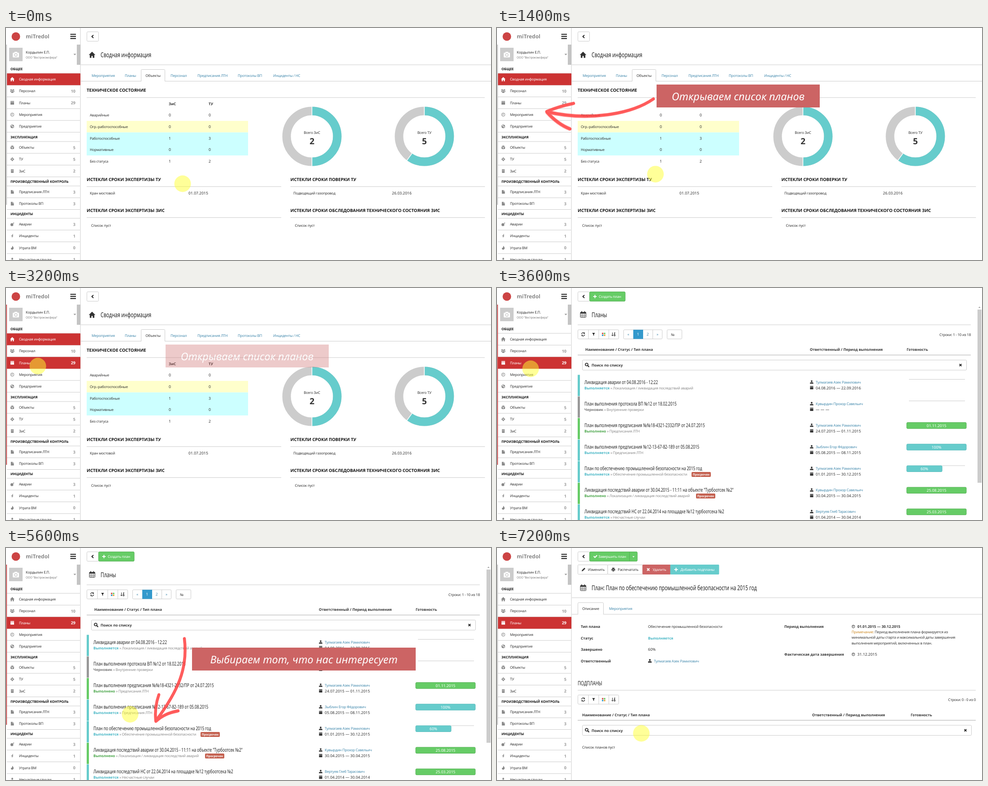
Animation, 1082 px wide and 517 px high, one loop 8 s. Source, as an HTML page:

```html
<!DOCTYPE html>
<html lang="ru">
<head>
<meta charset="utf-8">
<title>Планы</title>
<style>
html, body { margin: 0; width: 100%; height: 100%; overflow: hidden; background: #fff; }
svg { display: block; width: 100%; height: 100%; }
text { font: 8px "Noto Sans", "Open Sans", sans-serif; letter-spacing: -.25px; fill: #333; text-rendering: geometricPrecision; white-space: pre; }
.n { font-size: 8.6px; letter-spacing: 0; }
.b { font-weight: 700; font-size: 8.1px; letter-spacing: 0; }
.h { font-weight: 700; font-size: 9.6px; letter-spacing: 0; fill: #111; }
.s { font-weight: 700; font-size: 7.45px; letter-spacing: 0; fill: #111; }
.count { font-weight: 700; font-size: 9px; letter-spacing: 0; fill: #999; }
.cond { letter-spacing: 0; fill: #222; }
.say { font-size: 23.3px; font-style: italic; font-weight: 500; letter-spacing: 0; }
.tag { font-weight: 700; font-size: 6.6px; letter-spacing: 0; }
.total { font-weight: 700; font-size: 19px; }
.logo { font-weight: 700; font-size: 12px; letter-spacing: 0; fill: #888; }
.firm { font-size: 6.5px; fill: #777; }
.link { fill: #4088ac; }
.mute { fill: #888; }
.white { fill: #fff; }
.e { text-anchor: end; }
.m { text-anchor: middle; }
</style>
</head>
<body>
<svg id="stage" viewBox="0 0 1082 517" preserveAspectRatio="none"></svg>
<script>
const TEAL = '#66cccc', GREEN = '#66cc66', GREY = '#cccccc', RED = '#cc3333', ROSE = '#cc6464', DARK = '#333';

const ICONS = {
  home: 'M-5 0L0-5 5 0H3.5V4.5H1V1.5H-1V4.5H-3.5V0Z',
  people: 'M-1.6-1.5a1.6 1.6 0 1 1 3.2 0a1.6 1.6 0 1 1-3.2 0ZM-2.5 4V2Q-2.5 .6 0 .6T2.5 2V4ZM-4-2.5a1.2 1.2 0 1 1 2.2 0a1.2 1.2 0 1 1-2.2 0ZM1.8-2.5a1.2 1.2 0 1 1 2.2 0a1.2 1.2 0 1 1-2.2 0ZM-4.5 2V-.5H-2.6V2ZM4.5 2V-.5H2.6V2Z',
  user: 'M-2-2a2 2 0 1 1 4 0a2 2 0 1 1-4 0ZM-4 4V2.5Q-4 .6 0 .6T4 2.5V4Z',
  plan: 'M-4-4H4V-2.2H-4ZM-4-1.4H4V4H-4Z',
  clock: 'M-4 0a4 4 0 1 1 8 0a4 4 0 1 1-8 0ZM-3 0a3 3 0 1 0 6 0a3 3 0 1 0-6 0ZM-.5-2.2H.5V.7H-1.8V-.3H-.5Z',
  globe: 'M-4 0a4 4 0 1 1 8 0a4 4 0 1 1-8 0ZM-2.5-2L0-3 .5-1-1 .5ZM.5 0L3-.5 2 2.5.5 2Z',
  cube: 'M0-4.5L4-2.5 0-.7-4-2.5ZM-4-1.5L-.5 0V4.2L-4 2.5ZM4-1.5L.5 0V4.2L4 2.5Z',
  gear: 'M-3 0a3 3 0 1 1 6 0a3 3 0 1 1-6 0ZM-1.2 0a1.2 1.2 0 1 0 2.4 0a1.2 1.2 0 1 0-2.4 0ZM-.8-4.2H.8V-3H-.8ZM-.8 3H.8V4.2H-.8ZM-4.2-.8H-3V.8H-4.2ZM3-.8H4.2V.8H3Z',
  house: 'M-3-4H3V4H-3ZM-1.8-2.8H-.6V-1.6H-1.8ZM.6-2.8H1.8V-1.6H.6ZM-1.8-.4H-.6V.8H-1.8ZM.6-.4H1.8V.8H.6Z',
  file: 'M-3.2-4H.6V-1H3.5V4H-3.2ZM1.3-4L3.5-1.7H1.3Z',
  bomb: 'M-4 1a3.2 3.2 0 1 1 6.4 0a3.2 3.2 0 1 1-6.4 0ZM1.6-2L3-4 4.4-3 2.6-1Z',
  bolt: 'M1-4.5L-2.5.8H-.3L-1 4.5 2.5-1H.3L2-4.5Z',
  flame: 'M0-4.5Q4-.5 2.8 2.3Q1.5 4.3 0 4.3Q-4 4-2.8-.5Q-1.8 1-1.2.5Q0-2 0-4.5Z',
  cross: 'M-3.4-2L-2-3.4 0-1.4 2-3.4 3.4-2 1.4 0 3.4 2 2 3.4 0 1.4-2 3.4-3.4 2-1.4 0Z',
  plus: 'M-1-4H1V-1H4V1H1V4H-1V1H-4V-1H-1Z',
  check: 'M-4.5 0L-3-1.5-1 .5 3-3.5 4.5-2-1 3.5Z',
  pencil: 'M-4 4L-3.3 1.3 2-4 4-2-1.3 3.3Z',
  printer: 'M-2.5-4H2.5V-1.8H-2.5ZM-4-1.2H4V2.2H2.5V.8H-2.5V2.2H-4ZM-2 1.5H2V4H-2Z',
  funnel: 'M-4-4H4L1 0V4L-1 3V0Z',
  caret: 'M-3-1.5H3L0 1.8Z'
};

const icon = (name, x, y, fill = DARK, k = 1) =>
  `<path d="${ICONS[name]}" fill="${fill}" fill-rule="evenodd" transform="translate(${x} ${y}) scale(${k})"/>`;
const box = (x1, y1, x2, y2, fill, stroke = 'none', r = 0) =>
  `<rect x="${x1}" y="${y1}" width="${x2 - x1}" height="${y2 - y1}" rx="${r}" fill="${fill}" stroke="${stroke}"/>`;
const stroke = (d, color = GREY, w = 1) => `<path d="${d}" fill="none" stroke="${color}" stroke-width="${w}"/>`;
const rule = (x1, x2, y, w = 1) => stroke(`M${x1} ${y}H${x2}`, GREY, w);
const text = (x, y, s, cls = '') =>
  `<text x="${x}" y="${y}" class="${/^[\d.%— ]+$/.test(s) ? 'n ' : ''}${cls}">${s}</text>`;
const narrow = (x, y, size, s) =>
  `<text class="cond" transform="translate(${x} ${y}) scale(.7 1)" style="font-size:${size}px">${s}</text>`;
const group = (id, body) => `<g id="${id}">${body}</g>`;

// Sidebar
const MENU = [
  [101, 'ОБЩЕЕ', [['home', 'Сводная информация', ''], ['people', 'Персонал', 10], ['plan', 'Планы', 29],
    ['clock', 'Мероприятия', ''], ['globe', 'Предприятие', '']]],
  [253, 'ЭКСПЛУАТАЦИЯ', [['cube', 'Объекты', 5], ['gear', 'ТУ', 5], ['house', 'ЗиС', 2]]],
  [352, 'ПРОИЗВОДСТВЕННЫЙ КОНТРОЛЬ', [['file', 'Предписания ЛТН', 3], ['file', 'Протоколы ВП', 3]]],
  [424, 'ИНЦИДЕНТЫ', [['bomb', 'Аварии', 3], ['bolt', 'Инциденты', 1], ['flame', 'Утрата ВМ', 0],
    ['user', 'Несчастные случаи', 1]]]
];
const ROW = 26.25;

function menuRow(top, i, [pic, label, count], active) {
  const y = top + i * ROW + 13.2, white = active ? 'white' : '';
  return (active ? box(2, y - 13, 166, y + 13.2, RED) : rule(2, 165, top + (i + 1) * ROW)) +
    icon(pic, 14, y, active ? '#fff' : '#888') + text(29, y + 3, label, white) + text(155, y + 3.3, count, 'count e ' + white);
}

const sidebar = box(0, 0, 166, 517, '#fff') + stroke('M166 0V517') +
  MENU.map(([top, title, rows]) => rule(2, 165, top) + text(10, top - 6.8, title, 's') +
    rows.map((r, i) => menuRow(top, i, r)).join('')).join('') +
  `<circle cx="22" cy="19" r="9.5" fill="#c44"/>` + text(44, 22.5, 'miTredol', 'logo') +
  stroke('M143.500 14H156M143.500 18.700H156M143.500 23.400H156', '#222', 2.2) +
  box(7, 44, 37, 74, GREY) + box(15, 55, 29, 65.5, '#fff', 'none', 1.5) + box(19, 53, 25, 56, '#fff') +
  `<circle cx="22" cy="60" r="3" fill="#fff" stroke="${GREY}" stroke-width="1.3"/>` +
  text(44, 56.5, 'Кордылин Е.П.') + text(44, 68, 'ООО "Вестрокомсфера"', 'firm') +
  icon('caret', 153.5, 59, '#999') + box(158, 37, 166, 82, '#c4c4c4') +
  group('hover0', menuRow(101, 0, MENU[0][2][0], true)) + group('hover2', menuRow(101, 2, MENU[0][2][2], true)) +
  `<rect id="strip" y="37" width="2.2" height="357"/>`;

// Shared parts
const back = box(180.5, 8.5, 206.5, 29.5, '#fff', GREY, 2) + stroke('M195 15.700L191.500 19 195 22.300', '#222', 1.9);
const calendar = y => box(186, y - 5, 198.5, y + 6.5, '#fff', DARK, 1) + box(186, y - 5, 198.5, y - 2, DARK) +
  stroke(`M189 ${y - 7.5}V${y - 4}M195.500 ${y - 7.5}V${y - 4}`, DARK, 1.6) +
  stroke(`M186 ${y + 1}H198.500M186 ${y + 3.7}H198.500M190 ${y - 2}V${y + 6}M194.500 ${y - 2}V${y + 6}`, '#555', .8);
const tab = (x1, x2, y, s) => rule(167, 1082, y) +
  stroke(`M${x1 + .5} ${y}V${y - 24}q0-2 2-2H${x2 - 2.5}q2 0 2 2V${y}`) + rule(0, 0, 0) +
  stroke(`M${x1 + 1} ${y}H${x2 - 1}`, '#fff', 1.6) + text((x1 + x2) / 2, y - 9.5, s, 'm');

function toolbar(y) {
  const c = y + 10.2;
  return box(180.5, y, 271.5, y + 20.5, '#fff', GREY, 2) + stroke(`M204 ${y}v20.500M227 ${y}v20.500M249.500 ${y}v20.500`) +
    stroke(`M188.700 ${c - .5}a3.500 3.500 0 0 1 6.400-1.600M195.700 ${c + .7}a3.500 3.500 0 0 1-6.400 1.600`, '#222', 1.3) +
    stroke(`M195.500 ${c - 4}v2.400h-2.600M189 ${c + 4}v-2.400h2.600`, '#222', 1) +
    icon('funnel', 215.5, c, '#222', .8) +
    box(234, c - 3.5, 237.3, c - .3, '#d9534f') + box(238.3, c - 3.5, 241.7, c - .3, GREEN) +
    box(234, c + .6, 237.3, c + 3.8, '#39c') + box(238.3, c + .6, 241.7, c + 3.8, '#e8a33d') +
    stroke(`M257.500 ${c - 4}v7M255.700 ${c + 1.5}l1.800 2.300 1.800-2.300M261 ${c - 3.5}h2.600l-2.600 3h2.600M261 ${c + 1}h2.600v2.600h-2.600z`, '#222', 1);
}

const listHead = (y, xs, right) =>
  ['Наименование / Статус / Тип плана', 'Ответственный / Период выполнения', 'Готовность']
    .map((s, i) => text(xs[i], y, s, 'b')).join('') +
  rule(180, right, y + 9.3, 1.8) + box(190.5, y + 20.5, right - 9.5, y + 43, '#fff', GREY, 2) +
  `<circle cx="200" cy="${y + 30.5}" r="3" fill="none" stroke="#222" stroke-width="1.6"/>` +
  stroke(`M202 ${y + 32.5}l3.500 3.500`, '#222', 2) + text(211, y + 35, 'Поиск по списку', 'b') +
  icon('cross', right - 23, y + 31.7, '#222', .9);

// Summary page
function donut(x, label, total, share) {
  const cut = a => `<path d="M0-70V-44" stroke="#fff" stroke-width="1.6" transform="rotate(${a})"/>`;
  const ring = (color, part) => `<circle r="56.500" fill="none" stroke="${color}" stroke-width="19" pathLength="100" stroke-dasharray="${part} 100" transform="rotate(-90)"/>`;
  return `<g transform="translate(${x} 241.500)">${ring(GREY, 100)}${ring(TEAL, share)}${cut(0)}${cut(share * 3.6)}` +
    text(0, -6, label, 'm') + `<text y="17" class="total m">${total}</text></g>`;
}
const expired = (x, y, title) => text(x, y, title, 'h') + rule(x, x + 434, y + 12.5);
const STATES = [['Аварийные', 0, 0], ['Огр.-работоспособные', 0, 0], ['Работоспособные', 1, 3], ['Нормативные', 0, 0], ['Без статуса', 1, 2]];

const summary = back + icon('home', 192, 60, DARK, 1.45) + narrow(211, 64.5, 15, 'Сводная информация') + rule(167, 1082, 82) +
  tab(301, 355, 118.5, 'Объекты') +
  [[191, 'Мероприятия'], [265, 'Планы'], [367, 'Персонал'], [427, 'Предписания ЛТН'], [517, 'Протоколы ВП'], [596, 'Инциденты / НС']]
    .map(([x, s]) => text(x, 109, s, 'link')).join('') +
  text(180, 142, 'ТЕХНИЧЕСКОЕ СОСТОЯНИЕ', 'h') + rule(180, 1068, 155) +
  text(363, 171.7, 'ЗиС', 'b') + text(452, 171.7, 'ТУ', 'b') +
  box(180, 207, 540, 232.7, '#ffffcc') + box(180, 232.7, 540, 284, '#ccffff') +
  STATES.map((r, i) => r.map((s, j) => text([187, 363, 452][j], 197.3 + i * 25.7, s)).join('')).join('') +
  donut(682.5, 'Всего ЗиС', 2, 50) + donut(933.3, 'Всего ТУ', 5, 60) +
  expired(180, 341, 'ИСТЕКЛИ СРОКИ ЭКСПЕРТИЗЫ ТУ') + expired(634.5, 341, 'ИСТЕКЛИ СРОКИ ПОВЕРКИ ТУ') +
  expired(180, 410, 'ИСТЕКЛИ СРОКИ ЭКСПЕРТИЗЫ ЗИС') + expired(634.5, 410, 'ИСТЕКЛИ СРОКИ ОБСЛЕДОВАНИЯ ТЕХНИЧЕСКОГО СОСТОЯНИЯ ЗИС') +
  text(187, 370.5, 'Кран мостовой') + text(407, 370.5, '01.07.2015') +
  text(641, 370.5, 'Подводящий газопровод') + text(861, 370.5, '26.03.2016') +
  text(190, 443, 'Список пуст') + text(644.5, 443, 'Список пуст');

// Plan list page
const STATUS = { 'Выполняется': [TEAL, '#45b5c4'], 'Черновик': ['#999', '#777'], 'Выполнено': [GREEN, '#47a447'] };
const BOSS = 'Тулмагаев Азек Рамилович', DEPUTY = 'Кувырдин Прохор Савельич';
const PLANS = [
  ['Ликвидация аварии от 04.08.2016 - 12:22', 'Выполняется', 'Локализация / ликвидация последствий аварий', BOSS, '04.08.2016 — 22.09.2016', ''],
  ['План выполнения протокола ВП №12 от 18.02.2015', 'Черновик', 'Внутренние проверки', DEPUTY, '— — —', ''],
  ['План выполнения предписания №№18-4321-2332/ПР от 24.07.2015', 'Выполнено', 'Предписания ЛТН', BOSS, '24.07.2015 — 01.11.2015', '01.11.2015'],
  ['План выполнения предписания №12-13-67-82-189 от 05.08.2015', 'Выполняется', 'Предписания ЛТН', 'Зыблин Егор Фёдорович', '05.08.2015 — 08.11.2015', '100%'],
  ['План по обеспечению промышленной безопасности на 2015 год', 'Выполняется', 'Обеспечение промышленной безопасности', BOSS, '01.01.2015 — 30.12.2015', '60%', 434],
  ['Ликвидация последствий аварии от 30.04.2015 - 11:11 на объекте "Турбоотсек №2"', 'Выполнено', 'Локализация / ликвидация последствий аварий', DEPUTY, '30.04.2015 — 30.04.2015', '25.08.2015', 444],
  ['Ликвидация последствий НС от 22.04.2014 на площадке №12 турбоотсека №2', 'Выполняется', 'Несчастные случаи', 'Вертуев Глеб Тарасович', '01.04.2014 — 30.04.2014', '25.03.2015']
];

function planRow([title, status, kind, who, dates, done, late], i) {
  const y = 193.5 + i * 48.1, [bar, ink] = STATUS[status];
  const end = done === '60%' ? 993 : 1047, fill = done.endsWith('%') ? TEAL : GREEN;
  return box(180, y, 185, y + 47.3, bar) + narrow(195, y + 20.2, 11.7, title) +
    text(195, y + 32, `<tspan class="b" style="fill:${ink}">${status}</tspan> » ${kind}`, 'mute') +
    (late ? box(late, y + 24, late + 43, y + 35, '#c4604f', 'none', 2) + text(late + 21.5, y + 31.8, 'Просрочен', 'tag white m') : '') +
    icon('user', 702, y + 16, DARK, .95) + text(711, y + 19.3, who, 'link') +
    icon('plan', 702, y + 28.7, DARK, .9) + text(711, y + 32, dates) +
    (end < 1047 || !done ? rule(done ? end : 919, 1044, y + 10) : '') +
    (done && box(914, y + 10, end, y + 23.5, fill, fill === GREEN ? '#55b055' : '#5bbcbc', 2) + text((914 + end) / 2, y + 20, done, 'white m'));
}

const list = back + box(206.5, 8.5, 286, 29.5, GREEN, '#55b055', 2) + icon('plus', 218.5, 19, '#fff', .95) + text(227, 22, 'Создать план', 'white') +
  calendar(59) + narrow(211, 64.5, 15, 'Планы') + rule(180, 1057, 82) + toolbar(93) +
  box(282.5, 93, 368.5, 113.5, '#fff', GREY, 2) + box(304, 93, 326, 113.5, '#3399cc') + stroke('M347.500 93v20.500') +
  ['«', '1', '2', '»'].map((s, i) => text(293 + i * 21.6, 106.3, s, 'm ' + (i === 1 ? 'white' : 'link'))).join('') +
  box(379.5, 93, 412.5, 113.5, '#fff', GREY, 2) + text(388, 106.5, '№') + text(1057, 106.5, 'Строки: 1 - 10 из 18', 'e') +
  listHead(140, [197, 698, 914], 1057) + PLANS.map(planRow).join('') +
  icon('caret', 1076.3, 43, '#999', -.8) + box(1072, 48, 1081, 434, GREY);

// Single plan page
const actions = [[180.5, 247, '#fff', 'pencil', 'Изменить'], [247, 325, '#fff', 'printer', 'Распечатать'],
  [325, 387, ROSE, 'cross', 'Удалить'], [387, 495, TEAL, 'plus', 'Добавить подпланы']];
const details = [['Тип плана', 'Обеспечение промышленной безопасности'], ['Статус', '<tspan class="b" style="fill:#45b5c4">Выполняется</tspan>'],
  ['Завершено', '60%'], ['Ответственный', '']];

const plan = back + box(206.5, 8.5, 313, 29.5, GREEN, '#55b055', 2) + stroke('M295.500 8.500V29.500', '#55b055') +
  icon('check', 219.5, 19, '#fff') + text(226, 22, 'Завершить план', 'white') + icon('caret', 304.5, 19.5, '#fff', .8) +
  actions.map(([x1, x2, fill, pic, s]) => {
    const plain = fill === '#fff';
    return box(x1, 37.5, x2, 58.5, fill, plain ? GREY : fill, 1) + icon(pic, x1 + 12.5, 48, plain ? DARK : '#fff') +
      text(x1 + 22.3, 51, s, plain ? '' : 'white');
  }).join('') +
  calendar(88.5) + narrow(211, 93.5, 15, 'План: План по обеспечению промышленной безопасности на 2015 год') + rule(167, 1082, 110.8) +
  tab(180, 238, 147.7, 'Описание') + text(250, 138, 'Мероприятия', 'link') +
  details.map(([k, v], i) => text(187, 178 + i * 25.7, k, 'b') + text(337, 178 + i * 25.7, v)).join('') +
  icon('user', 341, 251.5) + text(350, 255, BOSS, 'link') +
  text(641, 178, 'Период выполнения', 'b') + icon('clock', 795, 175, DARK, .85) + text(804, 178, '01.01.2015 — 30.12.2015', 'b') +
  text(791, 190, '<tspan style="fill:#cc8822">Примечание:</tspan> Период выполнения плана формируется из') +
  text(791, 202.3, 'минимальной даты старта и максимальной даты завершения') + text(791, 214.6, 'выполнения мероприятий, включенных в план.') +
  text(641, 240, 'Фактическая дата завершения', 'b') + icon('clock', 795, 237, DARK, .85) + text(804, 240, '31.12.2015') +
  narrow(180, 305.5, 13.3, 'ПОДПЛАНЫ') + rule(180, 1068, 317) + toolbar(327.5) + text(1068, 341, 'Строки: 0 - 0 из 0', 'e') +
  listHead(374.5, [190, 703, 923], 1068) + text(190, 447, 'Список планов пуст');

// Callouts with brushed arrows
const brush = d => stroke(d, '#ff3c3c', 6.5) +
  `<g opacity=".6"><g transform="translate(1 -3)">${stroke(d, '#ff4a4a', 2)}</g><g transform="translate(-1.500 3)">${stroke(d, '#ff4a4a', 2.4)}</g></g>`;
const callout = (n, x1, y1, x2, s, strokes) =>
  group('arrow' + n, `<g opacity=".85" stroke-linecap="round">${strokes.map(brush).join('')}</g>`) +
  group('box' + n, box(x1, y1, x2, y1 + 51, ROSE) + text((x1 + x2) / 2, y1 + 34.5, s, 'say white m'));

const stage = document.getElementById('stage');
stage.innerHTML = box(0, 0, 1082, 517, '#fff') + group('page0', summary) + group('page1', list) + group('page2', plan) + sidebar +
  callout(0, 356, 126, 720, 'Открываем список планов',
    ['M349 158C300 192 205 208 113 187', 'M171 168Q140 174 111 186', 'M111 187Q135 214 163 225']) +
  callout(1, 415, 222, 914, 'Выбираем тот, что нас интересует',
    ['M398 202C406 268 384 318 336 383', 'M341 327Q331 355 334 385', 'M384 363Q354 368 335 386']) +
  `<circle id="spot" r="18.500" fill="#ffff33" opacity=".5"/><circle id="ring" fill="none" stroke="#ff6622" stroke-width="2"/>`;

const $ = id => document.getElementById(id);
const ramp = (t, a, b) => Math.min(1, Math.max(0, (t - a) / (b - a)));
const show = (id, on) => { $(id).style.display = on ? '' : 'none'; };
const PATH = [[1200, 394, 347], [2100, 73, 178], [3200, 71, 174], [3600, 75, 180], [4800, 75, 180], [5900, 322, 413]];

function spotAt(t) {
  let [, x, y] = PATH[0];
  for (let i = 1; i < PATH.length; i++) {
    const p = ramp(t, PATH[i - 1][0], PATH[i][0]), ease = p * p * (3 - 2 * p);
    x += (PATH[i][1] - PATH[i - 1][1]) * ease;
    y += (PATH[i][2] - PATH[i - 1][2]) * ease;
  }
  return [x, y];
}

function fade(n, t, start, end) {
  $('box' + n).style.opacity = ramp(t, start - 100, start + 200) * (1 - ramp(t, end - 200, end + 100));
  $('arrow' + n).style.opacity = ramp(t, start, start + 400) * (1 - ramp(t, end - 600, end));
}

function draw(now) {
  const t = Math.floor(now % 8000 / 200) * 200; // the picture moves in steps of 200 ms
  const page = t < 3400 ? 0 : t < 7200 ? 1 : 2;
  for (let i = 0; i < 3; i++) show('page' + i, i === page);
  show('hover0', page === 0);
  show('hover2', t >= 2000);
  $('strip').setAttribute('fill', t >= 2400 && t < 6600 ? ROSE : GREY);
  fade(0, t, 1000, 3200);
  fade(1, t, 5000, 7000);

  const [x, y] = spotAt(t);
  $('spot').setAttribute('transform', `translate(${x} ${y})`);
  const click = t < 4000 ? t - 2800 : t - 6600;
  show('ring', click >= 0 && click < 400);
  $('ring').setAttribute('r', 4 + 2.5 * ramp(click, 0, 200));
  $('ring').setAttribute('transform', `translate(${x - 6} ${y - 10.5})`);
  requestAnimationFrame(draw);
}
requestAnimationFrame(draw);
</script>
</body>
</html>
```
